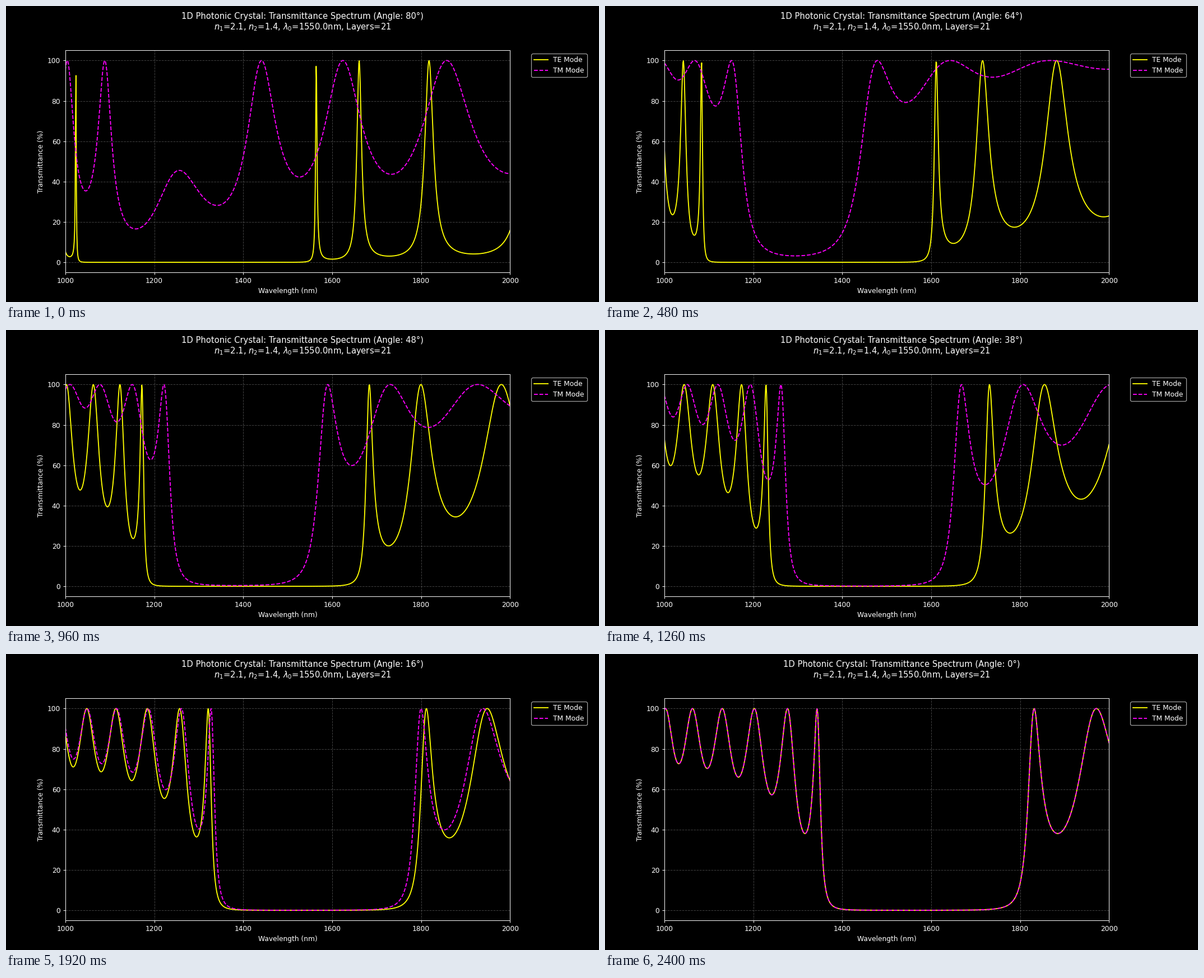
These frames come from a looping animation (1058x529 px, 2.46 s). A matplotlib script:

```python
import numpy as np
import matplotlib.pyplot as plt
from matplotlib.animation import FuncAnimation

N1, N2 = 2.1, 1.4
CENTER_NM = 1550.0
LAYERS = 21
ANGLES = np.arange(80, -1, -2)
INTERVAL_MS = 60

wavelengths = np.linspace(1000, 2000, 1001)


def cos_inside(n, angle):
    """Cosine of the refracted angle inside a medium of index n."""
    return np.sqrt(1 - (np.sin(angle) / n) ** 2)


def admittance(n, angle, mode):
    cos_t = cos_inside(n, angle)
    return n * cos_t if mode == "TE" else n / cos_t


def layer_matrix(n, angle, mode):
    """Characteristic matrices of one quarter-wave layer, one per wavelength."""
    phase = np.pi / 2 * CENTER_NM / wavelengths * cos_inside(n, angle)
    eta = admittance(n, angle, mode)
    c, s = np.cos(phase), np.sin(phase)
    rows = np.array([[c, 1j * s / eta], [1j * eta * s, c]])
    return np.moveaxis(rows, -1, 0)


def transmittance(angle, mode):
    """Percent transmitted by the stack H L H ... H surrounded by air."""
    high = layer_matrix(N1, angle, mode)
    low = layer_matrix(N2, angle, mode)
    stack = np.linalg.matrix_power(high @ low, LAYERS // 2) @ high
    eta0 = admittance(1.0, angle, mode)
    total = (stack[:, 0, 0] + stack[:, 1, 1]
             + eta0 * stack[:, 0, 1] + stack[:, 1, 0] / eta0)
    return 100 * np.abs(2 / total) ** 2


def title_text(degrees):
    return (f"1D Photonic Crystal: Transmittance Spectrum (Angle: {degrees}°)\n"
            f"$n_1$={N1}, $n_2$={N2}, $\\lambda_0$={CENTER_NM}nm, Layers={LAYERS}")


plt.style.use("dark_background")
plt.rcParams["font.family"] = "DejaVu Sans"

fig, ax = plt.subplots(figsize=(12, 6), dpi=88.16667)
fig.subplots_adjust(left=0.1, right=0.85, bottom=0.1, top=0.85)
title = fig.suptitle(title_text(ANGLES[0]), fontsize=12)

lines = {
    "TE": ax.plot([], [], color="yellow", label="TE Mode")[0],
    "TM": ax.plot([], [], color="magenta", linestyle="--", label="TM Mode")[0],
}
ax.set(xlim=(1000, 2000), ylim=(-5, 105),
       xlabel="Wavelength (nm)", ylabel="Transmittance (%)")
ax.grid(True, color="gray", linestyle="--", alpha=0.5)
ax.legend(loc="upper left", bbox_to_anchor=(1.04, 1))


def update(frame):
    degrees = ANGLES[frame]
    for mode, line in lines.items():
        line.set_data(wavelengths, transmittance(np.deg2rad(degrees), mode))
    title.set_text(title_text(degrees))
    return [*lines.values(), title]


anim = FuncAnimation(fig, update, frames=len(ANGLES), interval=INTERVAL_MS,
                     repeat=True, repeat_delay=0, blit=False)
plt.show()
```
